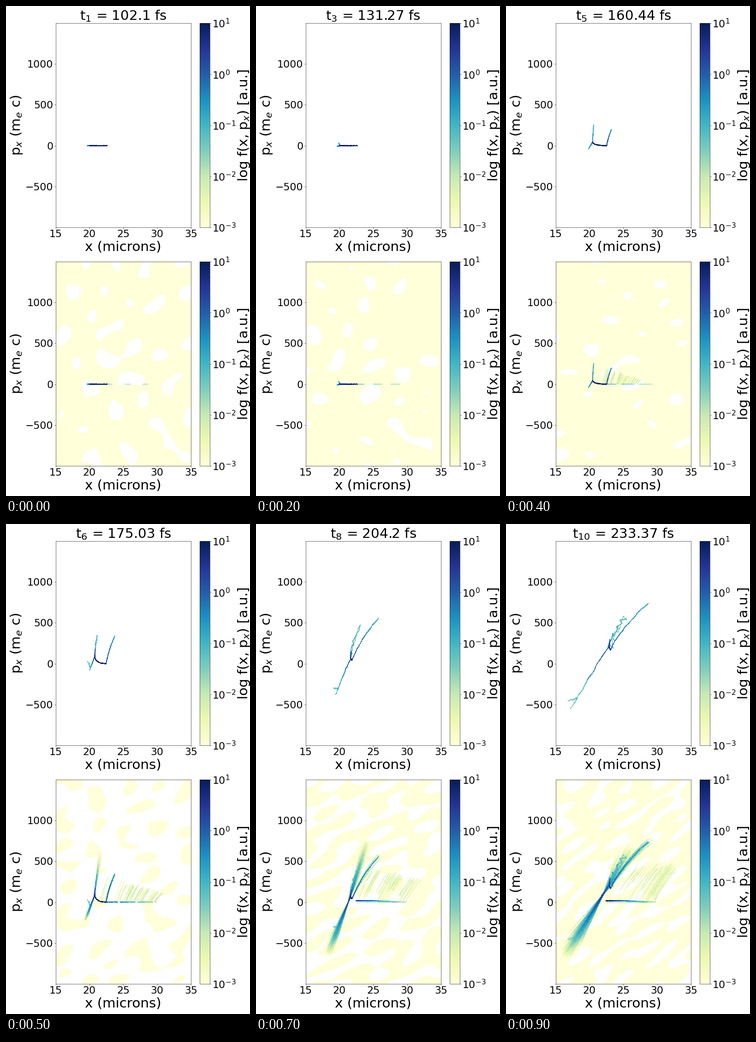
Recreate the animation shown at these times as a matplotlib script. Size 529x1058 px, loop 1000 ms.

```python
import numpy as np
import matplotlib.pyplot as plt
from matplotlib.animation import FuncAnimation
from matplotlib.colors import LogNorm

W, H = 529, 1058
COLS, ROWS = 294, 441
LEFT, WIDE = 107.5, 293.5
STEPS = 10
PERIOD = 14.5857  # femtoseconds between snapshots

# Landmarks of the electron curve (x, p) at a few steps, eased in between.
KEYS = [0, 2, 3, 5, 7, 9]
TIP = [(19.6, 0), (19.6, -8), (19.6, -12), (20, -75), (19.4, -390), (17.1, -560)]
KNEE = [(20, 0), (20, 0), (20.1, 0), (20.75, 90), (21.6, 70), (22.9, 215)]
HOOK = [(22.6, 0), (22.6, 0), (22.6, 0), (22.4, 0), (21.85, 45), (23.1, 175)]
END = [(22.6, 0), (22.6, 0), (22.7, 60), (23.7, 338), (25.7, 552), (28.65, 738)]
PEAK = [(19.95, 10), (19.85, 32), (20.1, 165), (21.1, 342), (23, 470), (25.5, 585)]

# Share of the lower panel covered by the palest colour at each step.
PALE = [.82, .7, .88, .23, .93, .27, .4, .53, .6, .64]

Y, X = np.mgrid[:ROWS, :COLS] + .5
U = np.linspace(0, 1, 1200)


def at(mark, i):
    return np.array([np.interp(i, KEYS, c) for c in zip(*mark)])


def stamp(img, x, p, level):
    x, p, level = (a.ravel() for a in np.broadcast_arrays(x, p, level))
    c = np.floor((x - 15) / 20 * COLS).astype(int)
    r = np.floor((1500 - p) / 2500 * ROWS).astype(int)
    ok = (c >= 0) & (c < COLS) & (r >= 0) & (r < ROWS)
    np.maximum.at(img, (r[ok], c[ok]), np.clip(level[ok], -3, 1))


def curve(img, rng, a, b, levels, bend=(.5, .5), wiggle=0.,
          copies=1, spread=(0, 0)):
    """Quadratic curve from a to b; copies fan out towards b."""
    x, p = (s + (e - s) * (2 * U * (1 - U) * k + U ** 2)
            for s, e, k in zip(a, b, bend))
    if wiggle:
        knots = np.linspace(0, 1, 14)
        x = x + np.interp(U, knots, rng.normal(0, .07 * wiggle, 14))
        p = p + np.interp(U, knots, rng.normal(0, 12 * wiggle, 14))
    off = rng.normal(size=(2, copies, 1))
    size = (copies, U.size)
    x = x + off[0] * spread[0] * U + rng.normal(0, .02, size)
    p = p + off[1] * spread[1] * U + rng.normal(0, 2.5, size)
    level = np.interp(U, np.linspace(0, 1, len(levels)), levels)
    if copies > 1:
        level = level - .6 * np.hypot(*off)
    stamp(img, x, p, level + rng.normal(0, .25, size))


def tracks(img, i):
    rng = np.random.default_rng(40 + i)
    tip, knee, hook, end, peak = (at(m, i) for m in (TIP, KNEE, HOOK, END, PEAK))
    late = np.clip((i - 4) / 5, 0, 1)
    curve(img, rng, tip, knee, [-1.7, -1.1, -.8 + .4 * late, -.2], wiggle=late)
    curve(img, rng, knee, hook, [.7 - .6 * late], bend=(.05, .97))
    if i > 1:
        for level in (-.9, -1.6):
            curve(img, rng, knee, peak, [level, level - .3, -1.7],
                  bend=(.3, .6), wiggle=2 * late)
    if i > 2:
        curve(img, rng, hook, end, [-.2, -.5 - .2 * late, -1.1],
              bend=(.35, .55), wiggle=.5 * late)
    if i > 4:
        curve(img, rng, knee, knee + (.05, 80), [0, -.5])
        curve(img, rng, tip + (-.3, 100), tip + .18 * (knee - tip), [-2.1, -1.5],
              wiggle=.5)


def halo(img, rng, i):
    """Spread-out bundles around the main curve."""
    s = (i - 4) / 5
    tip, knee, hook, end, peak = (at(m, i) for m in (TIP, KNEE, HOOK, END, PEAK))
    core = knee + .15 * (tip - knee)
    reach = 2.2 - 1.1 * s
    curve(img, rng, core, core + reach * (tip - core), [.2, -.5, -1, -2.4],
          copies=int(6 + 50 * s), spread=(.65 * s, 55 * s))
    curve(img, rng, core, core + reach * (peak - core), [0, -1, -1.7, -2.7],
          copies=int(6 + 45 * s), spread=(.8 * s, 75 * s))
    curve(img, rng, hook, end, [-.7, -.9, -1.1, -1.6], bend=(.35, .55),
          copies=int(8 * s), spread=(.35 * s, 35 * s))


def fan(img, rng, i):
    """Thin streaks rising from the line at rest, leaning more with time."""
    g = (i - 3) / 6
    a, b = 20.6 + .4 * (i - 3), min(29.8, 23 + 4.2 * (i - 3))
    n = 20 + 45 * min(1, i - 3)
    t = rng.random((n, 1)) ** (1 - .5 * g)
    h1, h2 = 130 + 310 * min(1, 2 * g), 490 * g ** 1.3
    h = (h1 + (h2 - h1) * t) * rng.uniform(.8, 1, (n, 1))
    start = rng.uniform(0, .8, (n, 1)) * (1 - t ** 3) * (i > 5)
    s = start + (1 - start) * np.linspace(0, 1, 260)
    level = rng.uniform(-3.1, -2.3, (n, 1)) + rng.normal(0, .2, s.shape)
    stamp(img, a + (b - a) * t + 3.2 * g * s ** 1.3, h * s, level)


def rest_line(img, rng, i):
    x = np.linspace(22.4, 29.8, 900)
    x = x[np.sin(2.4 * x + 3) + .3 * (i - 2) > 0]
    lift = 15 * (i > 6) * np.clip((29.8 - x) / 5, 0, 1)
    level = -1.6 + .22 * i - .04 * (i + 1) * (x - 22.4)
    for _ in range(1 + i // 3):
        stamp(img, x, lift + rng.normal(0, 3, x.size) * (i > 4) + 2,
              level + rng.normal(0, .3, x.size))
    if i > 6:
        stamp(img, x[x < 28.4], -6, -1.6)


def waves(rng, long, short, tilt, n=80):
    u = X * np.cos(tilt) - Y * np.sin(tilt)
    v = X * np.sin(tilt) + Y * np.cos(tilt)
    total = np.zeros((ROWS, COLS))
    for a, k, phase in rng.uniform([0, .7, 0], [6.283, 1.25, 6.283], (n, 3)):
        k *= 2 * np.pi
        total += np.cos(k * np.cos(a) / long * u
                        + k * np.sin(a) / short * v + phase)
    return total / np.sqrt(n / 2)


def grain(rng, i):
    """Pale patches that get finer and more slanted, thinner near the foil."""
    field = waves(rng, 62 + 3 * i, 62 - 4 * i, .07 * i)
    field -= .8 * np.exp(-((X - 130) / 65) ** 2 - ((Y - 235) / 70) ** 2)
    return field > np.quantile(field, 1 - PALE[i])


def upper(i):
    img = np.full((ROWS, COLS), -9.)
    tracks(img, i)
    return img


def lower(i):
    rng = np.random.default_rng(70 + i)
    img = np.where(grain(rng, i), -3., -9.)
    if i > 2:
        fan(img, rng, i)
    rest_line(img, rng, i)
    if i > 4:
        halo(img, rng, i)
    tracks(img, i)
    return img


def density(img):
    return np.ma.masked_where(img < -3, 10 ** img)


def panel(top):
    def box(x, w):
        return fig.add_axes([x / W, 1 - (top + ROWS) / H, w / W, ROWS / H])

    ax, cax = box(LEFT, WIDE), box(420, 21.6)
    im = ax.imshow(density(np.full((ROWS, COLS), -9.)), cmap='YlGnBu',
                   norm=LogNorm(1e-3, 10), extent=(15, 35, -1000, 1500),
                   aspect='auto', interpolation='nearest')
    ax.set_xticks(range(15, 36, 5))
    ax.set_yticks(range(-500, 1001, 500))
    ax.tick_params(labelsize=30)
    ax.set_xlabel('x (microns)', size=40)
    ax.set_ylabel('p$_x$ (m$_e$ c)', size=40)
    bar = fig.colorbar(im, cax=cax)
    bar.ax.tick_params(labelsize=30)
    bar.set_label('log f(x, p$_x$) [a.u.]', size=40, labelpad=2)
    return ax, im


plt.rcParams['font.family'] = 'DejaVu Sans'
fig = plt.figure(figsize=(10, 20), dpi=52.9, facecolor='white')
ax_top, im_top = panel(37)
_, im_low = panel(552)
title = ax_top.set_title('', size=40)


def draw(i):
    title.set_text(f't$_{{{i + 1}}}$ = {round((i + 7) * PERIOD, 2)} fs')
    im_top.set_data(density(upper(i)))
    im_low.set_data(density(lower(i)))
    return title, im_top, im_low


anim = FuncAnimation(fig, draw, frames=STEPS, interval=100, repeat=True)
plt.show()
```
